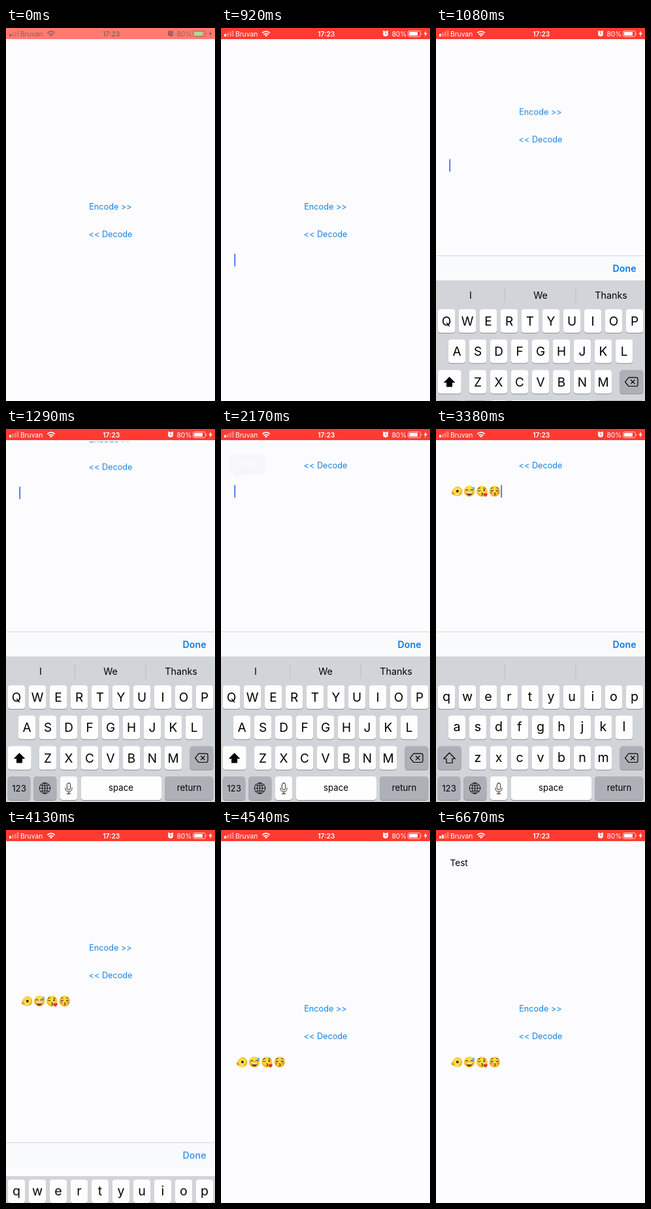
Animation, 320 px wide and 569 px high, one loop 7710 ms. Source, as an HTML page:

```html
<!DOCTYPE html>
<html lang="en">
<head>
<meta charset="utf-8">
<title>Emoji encoder</title>
<style>
  html, body { margin: 0; height: 100%; overflow: hidden; background: #fcfcff; }
  svg { display: block; width: 100vw; height: 100vh; font-family: Inter, "Open Sans", sans-serif; }
  .mid { text-anchor: middle; }
  .link { font-size: 12.7px; fill: #1682e2; }
  .status { font-size: 10.3px; }
  .hint { font-size: 14.3px; }
  .upper { font-size: 19px; }
  .lower { font-size: 19.7px; }
  .small { font-size: 13.2px; }
  .line { fill: none; stroke: #000; stroke-width: 1.2; stroke-linejoin: round; stroke-linecap: round; }
  .thin { stroke-width: .85; }

  .anim { animation: 7.71s linear infinite; }
  .spring {
    animation-timing-function: linear(0, .09, .264, .442, .594, .713, .801, .864, .908,
      .939, .96, .973, .983, .989, .993, .996, 1);
  }
  .step { animation-timing-function: step-end; }
  #view { animation-name: view; }
  #bar { animation-name: bar; }
  #keys { animation-name: keys; }
  #hints { animation-name: hints; }
  #done { animation-name: done; }
  #caret { animation-name: blink; }
  #caretX { animation-name: caretX; }
  #menu { animation-name: menu; }
  #live { animation-name: live; }
  #result { animation-name: result; }
  .signal2 { animation-name: signal; }
  .before { animation-name: before; }
  .after { animation-name: after; }

  @keyframes view {
    0%, 12.96% { transform: translateY(0); }
    17.47%, 52.34% { transform: translateY(-259px); }
    56.85%, 100% { transform: translateY(0); }
  }
  @keyframes bar {
    0%, 12.09% { transform: translateY(261px); }
    16.6%, 52.34% { transform: translateY(0); }
    56.85%, 100% { transform: translateY(261px); }
  }
  @keyframes keys {
    0%, 12.09% { transform: translateY(261px); }
    16.6%, 52.34% { transform: translateY(0); }
    56.85%, 100% { transform: translateY(222px); }
  }
  @keyframes hints { 0%, 52.34% { opacity: 1; } 52.98%, 100% { opacity: 0; } }
  @keyframes done {
    0%, 47.08% { opacity: 1; }
    47.99%, 51.23% { opacity: .2; }
    54.47%, 100% { opacity: 1; }
  }
  @keyframes blink {
    0%, 11.93% { opacity: 0; }
    11.94%, 22.18% { opacity: 1; }
    25.42%, 28.13% { opacity: 0; }
    28.14%, 52.27% { opacity: 1; }
    52.28%, 100% { opacity: 0; }
  }
  @keyframes caretX { 0% { transform: none; } 38.91%, 100% { transform: translateX(79px); } }
  @keyframes menu {
    0%, 28.1% { opacity: 0; }
    31.13%, 36.97% { opacity: 1; }
    40.2%, 100% { opacity: 0; }
  }
  @keyframes live { 0%, .52% { opacity: 0; } 2.72%, 100% { opacity: 1; } }
  @keyframes result { 0% { opacity: 0; } 73.02%, 100% { opacity: 1; } }
  @keyframes signal { 0% { opacity: .35; } 86.51%, 100% { opacity: 1; } }
  @keyframes before { 0% { opacity: 1; } 38.91%, 100% { opacity: 0; } }
  @keyframes after { 0% { opacity: 0; } 38.91%, 100% { opacity: 1; } }
</style>
</head>
<body>
<svg viewBox="0 0 320 569" preserveAspectRatio="none">
  <defs>
    <radialGradient id="skin" cy=".4" r=".62">
      <stop offset=".45" stop-color="#ffdd45"/>
      <stop offset="1" stop-color="#eda41f"/>
    </radialGradient>
  </defs>
  <rect width="320" height="569" fill="#fcfcff"/>

  <g id="view" class="anim spring">
    <text class="link mid" x="160" y="276.5">Encode &gt;&gt;</text>
    <text class="link mid" x="160" y="319">&lt;&lt; Decode</text>
    <g id="emoji" class="anim step after"></g>
    <g id="caretX" class="anim step">
      <rect id="caret" class="anim" x="20.3" y="344.5" width="1.8" height="19" fill="#4270e4"/>
    </g>
    <g id="menu" class="anim">
      <path d="M19 297H61a7 7 0 0 1 7 7V322a7 7 0 0 1-7 7H31L25 336L19 329a7 7 0 0 1-7-7V304a7 7 0 0 1 7-7Z" fill="#1c1c1e"/>
      <text class="mid" x="40" y="317.3" font-size="12" fill="#fff">Paste</text>
    </g>
  </g>
  <text id="result" class="anim step" x="21.5" y="55" font-size="13.6">Test</text>

  <g id="keys" class="anim spring"></g>
  <g id="bar" class="anim spring">
    <rect y="309" width="320" height="38" fill="#f9fafc"/>
    <rect y="309" width="320" height="1" fill="#d4d5d8"/>
    <text id="done" class="anim mid" x="288.6" y="333.7" font-size="14.2" font-weight="600" fill="#0b7be6">Done</text>
  </g>
  <!-- margin under the status bar hides links scrolled beneath it -->
  <rect y="17" width="320" height="2" fill="#fcfcff"/>
  <g id="status"></g>
</svg>
<script>
  const $ = id => document.getElementById(id);
  const text = (s, x, y, cls) => `<text class="mid ${cls}" x="${x}" y="${y}">${s}</text>`;

  function statusBar(bg, ink, charge) {
    const bars = [0, 1, 2, 3].map(i => {
      const h = 4 + i * 1.8;
      const cls = i === 1 ? 'class="anim step signal2"' : '';
      return `<rect ${cls} x="${5 + i * 3.9}" y="${13 - h}" width="2.9" height="${h}" rx=".6" opacity="${i ? .35 : 1}"/>`;
    }).join('');
    return `<rect width="320" height="17" fill="${bg}"/>
      <g class="status" fill="${ink}">${bars}
        <text x="22" y="12.8">Bruvan</text>
        <g fill="none" stroke="${ink}" stroke-width="1.8">
          <path d="M63.3 7.6a8 8 0 0 1 11.4 0M65.5 10a5 5 0 0 1 7 0"/>
        </g>
        <path d="M69 13.3L67 11.2a2.8 2.8 0 0 1 4 0Z"/>
        <text class="mid" x="161.3" y="12.8" font-weight="600">17:23</text>
        <circle cx="252" cy="8.8" r="4"/>
        <path d="M248 5.8l2-1.8M256 5.8l-2-1.8" stroke="${ink}" stroke-width="1.4"/>
        <path d="M252 6.4v2.6h1.8" fill="none" stroke="${bg}"/>
        <text x="261.5" y="12.8">80%</text>
        <rect x="286.5" y="4.5" width="18.8" height="8.6" rx="2" fill="none" stroke="${ink}" opacity=".75"/>
        <rect x="288" y="6" width="13" height="5.6" rx=".8" fill="${charge}"/>
        <path d="M306.6 7.2q1.6 1.6 0 3.2Z"/>
        <path d="M314 4l-3.6 5.2h2.4L312 13.4l3.8-5.6h-2.4Z"/>
      </g>`;
  }

  const cap = (x, y, w, fill = '#fefefe') =>
    `<rect x="${x}" y="${y + 1}" width="${w}" height="36" rx="4.3" fill="#8a8d91"/>
     <rect x="${x}" y="${y}" width="${w}" height="36" rx="4.3" fill="${fill}"/>`;

  function keyboard() {
    const board = '#d1d4d9', grey = '#adb1b7';
    let caps = '', upper = '', lower = '';
    [['QWERTYUIOP', 16, 391], ['ASDFGHJKL', 32, 437.3], ['ZXCVBNM', 64, 483.7]].forEach(([row, x0, y]) => {
      [...row].forEach((c, i) => {
        const x = x0 + i * 32;
        caps += cap(x - 13.3, y, 26.6);
        upper += text(c, x, y + 25, 'upper');
        lower += text(c.toLowerCase(), x, y + 23.8, 'lower');
      });
    });
    const shift = 'M20.5 494L29.3 503H25V509.5H16V503H11.7Z';
    return `<g id="hints" class="anim">
        <rect y="347" width="320" height="40" fill="${board}"/>
        <path d="M105.5 359v22M214 359v22" stroke="#b9bcc2"/>
        <g class="anim step before">
          ${text('I', 53, 375, 'hint')}${text('We', 160, 375, 'hint')}${text('Thanks', 268, 375, 'hint')}
        </g>
      </g>
      <rect y="386" width="320" height="190" fill="${board}"/>
      ${caps}
      <g class="anim step before">${upper}${cap(2.7, 483.7, 36)}<path d="${shift}"/></g>
      <g class="anim step after">${lower}${cap(2.7, 483.7, 36, grey)}<path class="line" d="${shift}"/></g>
      ${cap(281.5, 483.7, 35.8, grey)}
      <path class="line" d="M289.5 501.8L295 495.2H306.5a2.5 2.5 0 0 1 2.5 2.5V506a2.5 2.5 0 0 1-2.5 2.5H295Z
        M298.5 499l5.6 5.6M304.1 499l-5.6 5.6"/>
      ${cap(2.7, 530, 34.6, grey)}${cap(42.3, 530, 35, grey)}${cap(82.7, 530, 26.6)}
      ${cap(114.7, 530, 123.3)}${cap(243, 530, 74.3, grey)}
      ${text('123', 20, 552.8, 'small')}${text('space', 176, 552.2, 'small')}${text('return', 280.5, 552.2, 'small')}
      <g class="line thin">
        <circle cx="59.5" cy="548" r="8.3"/><ellipse cx="59.5" cy="548" rx="4" ry="8.3"/>
        <path d="M51.2 548h16.6M59.5 539.7v16.6M53 543.2q6.5 2.6 13 0M53 552.8q6.5-2.6 13 0"/>
        <rect x="93.4" y="540" width="5.2" height="10.5" rx="2.6"/>
        <path d="M91 547.5v1a5 5 0 0 0 10 0v-1M96 553.5v3M93.4 556.5h5.2"/>
      </g>`;
  }

  function face(x, features) {
    return `<g transform="translate(${x} 354)" fill="none" stroke="#5b340c" stroke-width="1.1" stroke-linecap="round">
      <circle r="8.3" fill="url(#skin)" stroke="none"/>${features}</g>`;
  }

  const kiss = '<path d="M-.6 2.2q2.6.2 1 1.7q2 1-.8 2"/>';
  const emoji = `<g transform="translate(32 354)">
      <path d="M-7.8 2.4Q-6-3.6-2.4-6Q1.6-8 5-5.6Q8.2-2.8 8 1Q7.6 5.2 3.6 6.6Q-.6 7.8-4 5.8Q-7 5.4-7.8 2.4Z"
        fill="url(#skin)" stroke="#e0a020" stroke-width=".6"/>
      <path d="M-8 1.6l3.4.6l-2.4 2.6Z" fill="#d9801a"/>
      <path d="M-4 5.2Q0 3 4.6 5Q0 7.6-4 5.2Z" fill="#fff0a0"/>
      <circle cx=".8" cy="-.2" r="1.9" fill="#2a1c08"/>
    </g>`
    + face(51, `<path d="M-5.4-1.2q1.7-2.8 3.4 0M2-1.2q1.7-2.8 3.4 0"/>
      <path d="M-5 1.4H5Q4.2 6.4 0 6.4T-5 1.4Z" fill="#6b3410" stroke="none"/>
      <path d="M-4.6 1.5H4.6L4 3.4H-4Z" fill="#fff" stroke="none"/>
      <path d="M6.2-7.8Q9-4.2 8-2.6Q6.3-1.2 4.8-2.8Q4.2-4.4 6.2-7.8Z" fill="#54b4ea" stroke="none"/>`)
    + face(70.3, `<path d="M-5.6-1.4q1.7 1.8 3.4 0M-5.6-4.2q1.4-1.3 3-.8M2.2-4.8q1.6-.6 3 .6"/>
      <ellipse cx="3.4" cy="-1.6" rx="1.2" ry="1.7" fill="#5b340c" stroke="none"/>${kiss}
      <path d="M5.4 8.4Q1.8 6 2.6 3.8Q4 2 5.6 3.8Q7.4 2.2 8.6 4Q9 6.2 5.4 8.4Z" fill="#e62b35" stroke="none"/>`)
    + face(89.8, `<g fill="#f28a4c" stroke="none"><circle cx="-5" cy="2" r="2"/><circle cx="5" cy="2" r="2"/></g>
      <path d="M-5.6-1.6q1.7 2 3.4 0M2.2-1.6q1.7 2 3.4 0M-5.4-4.4q1.4-1.2 3-.6M2.4-5q1.6-.6 3 .6"/>${kiss}`);

  $('keys').innerHTML = keyboard();
  $('emoji').innerHTML = emoji;
  $('status').innerHTML = statusBar('#ff7b72', '#94605a', '#a5df96')
    + `<g id="live" class="anim">${statusBar('#ff3b31', '#fff', '#fff')}</g>`;
</script>
</body>
</html>
```
